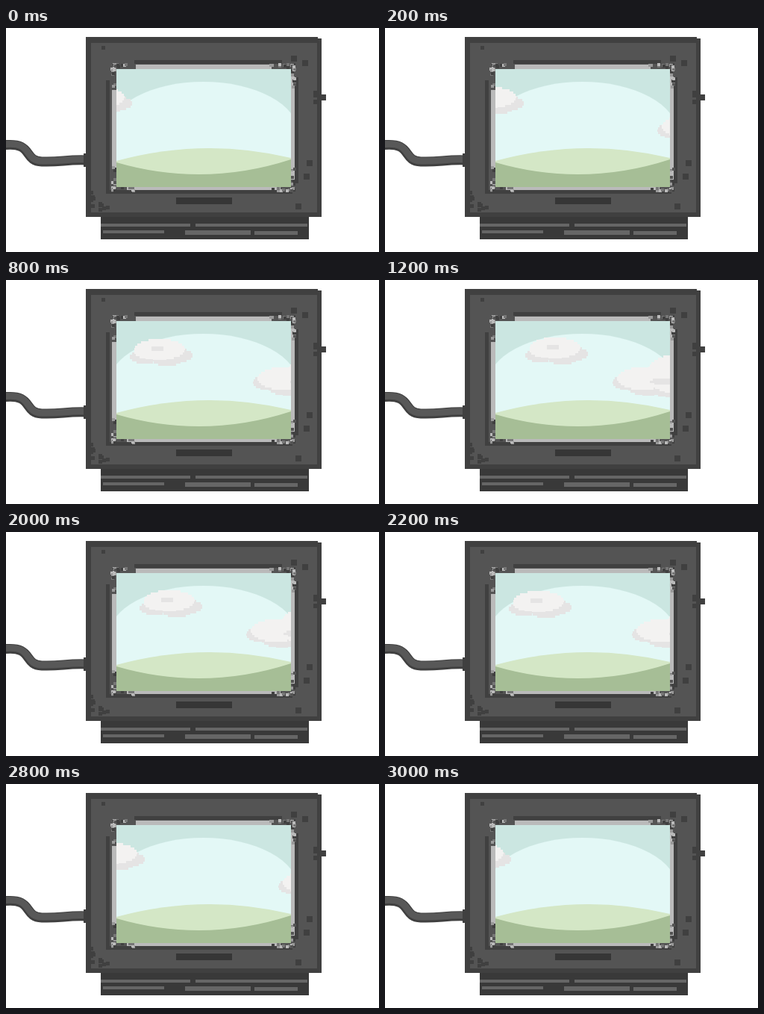
These frames come from a looping animation (500 by 300 pixels, 3.2 s). An HTML page with a canvas:

```html
<!DOCTYPE html>
<html lang="en">
<head>
<meta charset="utf-8">
<title>Clouds on a monitor</title>
<style>
html, body { margin: 0; width: 100%; height: 100%; overflow: hidden; background: #fff; }
canvas { display: block; }
</style>
</head>
<body>
<canvas id="stage" width="500" height="300"></canvas>
<script>
const ctx = document.getElementById('stage').getContext('2d');
const LOOP = 3200, STEP = 200, LAST = 6;
const SCREEN = { left: 148, top: 55, right: 382, bottom: 213 };
const BODY = '#545454', DARK = '#404040', DEEP = '#393939', STRIP = '#666', LIGHT = '#bababa';
const SKY = '#cbe6e1', GLOW = '#e3f8f6', GRASS = '#d4e7c6', GROUND = '#a6be96';
const WHITE = '#f3f2f1', SHADE = '#e5e4e4';

// Cloud positions, one per step of the drift
const LEFT_X = [85, 102, 118, 135, 166, 179, 188];
const RIGHT_X = [392, 365, 353, 342, 331, 322, 305];

let seed = 7;
function random() {
  seed = (seed * 16807) % 2147483647;
  return seed / 2147483647;
}

function box(color, left, top, right, bottom) {
  ctx.fillStyle = color;
  ctx.fillRect(left, top, right - left, bottom - top);
}

function square(color, x, y, size) {
  box(color, x, y, x + size, y + size);
}

// Oval built from thin rows with coarse ends
function blob(color, cx, cy, rx, ry) {
  const row = 3;
  for (let y = -ry; y < ry; y += row) {
    const h = Math.min(row, ry - y);
    const k = (y + h / 2) / ry;
    const half = Math.round(rx * Math.sqrt(1 - k * k));
    box(color, cx - half, cy + y, cx + half, cy + y + h);
  }
}

function drawCable() {
  const cable = new Path2D('M-4 157 C38 152 22 178 48 179 S80 176 108 177');
  const layer = (color, width, lift) => {
    ctx.save();
    ctx.translate(0, -lift);
    ctx.strokeStyle = color;
    ctx.lineWidth = width;
    ctx.stroke(cable);
    ctx.restore();
  };
  layer(DARK, 13, 0);
  layer('#585858', 9, 1);
  box(DARK, 104, 168, 109, 186);
}

function drawBase() {
  box(DEEP, 127, 253, 406, 283);
  box(STRIP, 127, 262, 247, 266);
  box(STRIP, 254, 262, 404, 266);
  box(STRIP, 130, 271, 212, 275);
  box(STRIP, 240, 271, 328, 277);
  box(STRIP, 333, 272, 391, 277);
}

function drawCase() {
  box(DARK, 107, 12, 418, 253);
  box(DARK, 417, 14, 423, 253);
  box(BODY, 114, 20, 417, 247);
  box(DARK, 423, 89, 429, 97);
  box('#363636', 228, 227, 303, 236);

  // Scuffs on the shell, denser in the lower left
  for (const [x, y] of [[382, 37], [397, 43], [403, 177], [388, 235], [399, 195]]) square(DARK, x, y, 8);
  square(DARK, 128, 24, 5);
  for (let i = 0; i < 12; i++) {
    const along = 26 * random() ** 2;
    square(DARK, 112 + along | 0, 242 - (26 - along) * random() | 0, 5);
  }
  for (let i = 0; i < 5; i++) square(DARK, 412, 64 + 36 * random() | 0, 5);
}

function drawBezel() {
  const { left, top, right, bottom } = SCREEN;
  box(DARK, 172, 43, 370, 48);
  box(DARK, 387, 66, 392, 208);
  box(DARK, 134, 217, 384, 222);
  box(DARK, 134, 70, 139, 217);
  box(LIGHT, left - 6, top + 28, left, bottom - 25);
  box(LIGHT, left + 26, top - 6, right - 26, top);
  box(LIGHT, right, top + 10, right + 5, bottom - 10);
  box(LIGHT, left + 14, bottom, right - 14, bottom + 4);

  // Worn grey specks spreading along both sides of each corner
  const tones = [DARK, '#777', '#999', BODY, LIGHT];
  for (const [x, sx] of [[left, 1], [right, -1]]) {
    for (const [y, sy] of [[top, 1], [bottom, -1]]) {
      for (let i = 0; i < 26; i++) {
        const along = 32 * random() ** 1.5 - 5, out = 1 + 5 * random();
        const [dx, dy] = i % 2 ? [along, -out] : [-out, along];
        square(tones[i % tones.length], x + sx * dx - 2 | 0, y + sy * dy - 2 | 0, 4);
      }
    }
  }
}

function drawLeftCloud(x, y) {
  blob(SHADE, x + 20, y + 24, 20, 9);
  blob(SHADE, x + 50, y + 27, 21, 9);
  blob(SHADE, x + 66, y + 22, 18, 9);
  blob(WHITE, x + 40, y + 14, 34, 14);
  blob(WHITE, x + 22, y + 17, 16, 9);
  blob(SHADE, x + 37, y + 13, 9, 3);
}

function drawRightCloud(x) {
  blob(SHADE, x + 18, 137, 18, 10);
  blob(SHADE, x + 48, 144, 28, 11);
  blob(SHADE, x + 80, 146, 30, 11);
  blob(WHITE, x + 40, 132, 34, 15);
  blob(WHITE, x + 80, 126, 34, 25);
  blob(SHADE, x + 68, 136, 18, 4);
}

// Curved band edge across the screen, peaking in the middle
function arc(color, y0, peak, y1) {
  const { left, right, bottom } = SCREEN;
  ctx.fillStyle = color;
  ctx.beginPath();
  ctx.moveTo(left, y0);
  ctx.quadraticCurveTo((left + right) / 2, 2 * peak - (y0 + y1) / 2, right, y1);
  ctx.lineTo(right, bottom);
  ctx.lineTo(left, bottom);
  ctx.fill();
}

function drawScene(step) {
  const { left, top, right, bottom } = SCREEN;
  ctx.save();
  ctx.beginPath();
  ctx.rect(left, top, right - left, bottom - top);
  ctx.clip();
  box(SKY, left, top, right, bottom);
  ctx.fillStyle = GLOW;
  ctx.beginPath();
  ctx.ellipse(264.5, 140, 127, 68, 0, 0, Math.PI * 2);
  ctx.fill();
  box(GLOW, left, 116, right, bottom);
  drawLeftCloud(LEFT_X[step], 79 - Math.max(0, step - 4));
  drawRightCloud(RIGHT_X[step]);
  arc(GRASS, 178, 161, 174);
  arc(GROUND, 180, 196, 176);
  ctx.restore();
}

// Drift in, hold, then drift back out
function stepAt(ms) {
  const t = ms % LOOP;
  const tick = Math.floor((t < LOOP / 2 ? t : LOOP - 0.001 - t) / STEP);
  return Math.min(LAST, tick);
}

let shown = -1;
function frame(now) {
  const step = stepAt(Math.max(0, now - start));
  if (step !== shown) drawScene(shown = step);
  requestAnimationFrame(frame);
}

drawCable();
drawBase();
drawCase();
drawBezel();
const start = performance.now();
frame(start);
</script>
</body>
</html>
```
